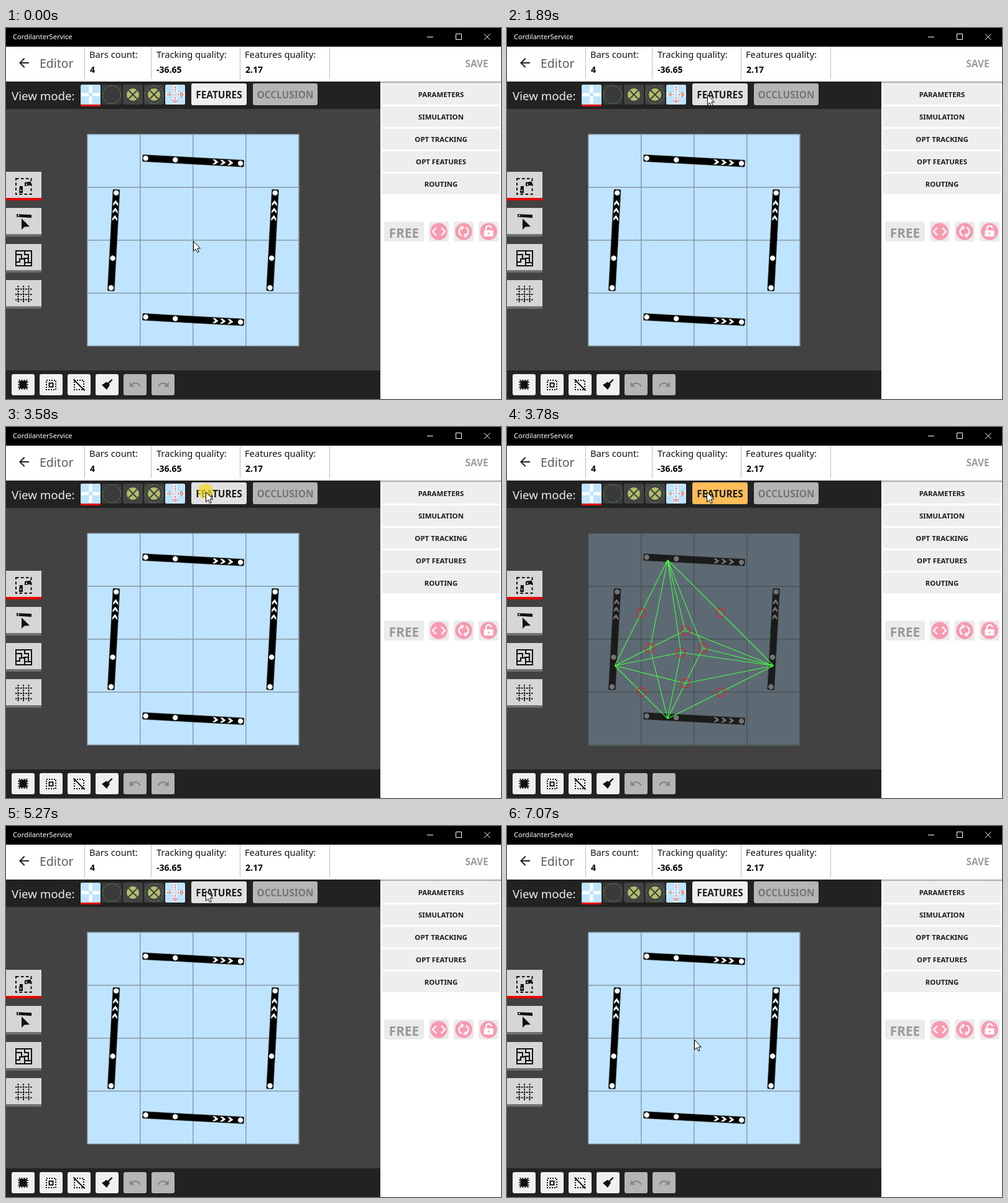
Animation of 796 by 596 pixels, one loop 7860 ms. Source, as an HTML page:

```html
<!DOCTYPE html>
<html lang="en">
<head>
<meta charset="utf-8">
<title>Editor</title>
<style>
html, body { margin: 0; width: 100%; height: 100%; overflow: hidden; background: #444; }
svg { display: block; width: 796px; height: 596px; }
text { font-family: "Noto Sans", "Open Sans", sans-serif; white-space: pre; }
.label { font-size: 14.7px; fill: #111; }
.value { font-size: 14px; font-weight: 700; fill: #000; }
.caps { font-size: 15.4px; font-weight: 600; text-anchor: middle; }
.menu { font-size: 11.4px; font-weight: 600; text-anchor: middle; fill: #1a1a1a; }
.tip { font-size: 13px; fill: #111; }
.line { fill: none; stroke: #111; stroke-width: 2; }
</style>
</head>
<body>
<svg id="stage" viewBox="0 0 796 596">
  <defs>
    <linearGradient id="shade" x2="0" y2="1">
      <stop stop-color="#999"/><stop offset="1" stop-color="#fff"/>
    </linearGradient>
    <g id="bar">
      <rect x="-5" y="-5.5" width="163" height="11" rx="1.5" stroke="#444" stroke-width=".6"/>
      <g fill="#fff">
        <circle r="4.2"/><circle cx="47.6" r="4.2"/><circle cx="152.6" r="4.2"/>
        <path id="chev" d="M107.5-4h4l5.5 4-5.5 4h-4l4.5-4z"/>
        <use href="#chev" x="12"/><use href="#chev" x="24"/>
      </g>
    </g>
    <path id="undo" d="M12.5 8c-2.65 0-5.05.99-6.9 2.6L2 7v9h9l-3.62-3.62c1.39-1.16 3.16-1.88 5.12-1.88 3.54 0 6.55 2.31 7.6 5.5l2.37-.78C21.08 11.03 17.15 8 12.5 8z"/>
    <path id="plus" d="M-15-2.5h12v5h-12zM3-2.5h12v5H3zM-2.5-15h5v12h-5zM-2.5 3h5v12h-5z"/>
  </defs>

  <!-- window title -->
  <rect width="796" height="30"/>
  <text x="11" y="18" font-size="11.1" fill="#fff">CordilanterService</text>
  <path d="M677 14.5h10M723.5 9.5h9v9h-9zM769 9.5l9.5 9.5M778.5 9.5l-9.5 9.5" fill="none" stroke="#fff"/>

  <!-- header -->
  <rect y="30" width="796" height="56" fill="#fff"/>
  <path transform="translate(17 44)" fill="#222" d="M20 11H7.83l5.59-5.59L12 4l-8 8 8 8 1.41-1.41L7.83 13H20z"/>
  <text x="54" y="64" font-size="19.4" fill="#5c5c5c">Editor</text>
  <path d="M126.5 30v52M233.5 30v52M376.5 30v52M520.5 30v52" stroke="#bdbdbd"/>
  <text class="label" x="134" y="48">Bars count:</text>
  <text class="label" x="242" y="48">Tracking quality:</text>
  <text class="label" x="384" y="48">Features quality:</text>
  <text class="value" x="135" y="72">4</text>
  <text class="value" x="242" y="72">-36.65</text>
  <text class="value" x="385" y="72">2.17</text>
  <text class="caps" x="757" y="62.5" fill="#9c9c9c">SAVE</text>

  <!-- work area -->
  <rect y="130" width="602" height="420" fill="#424242"/>
  <rect y="86" width="602" height="44" fill="#222"/>
  <rect y="550" width="602" height="46" fill="#222"/>
  <text x="9" y="115.5" font-size="18.7" fill="#ececec">View mode:</text>

  <!-- view mode icons -->
  <rect x="120" y="91" width="32" height="33" rx="2" fill="#bfe4ff"/>
  <use href="#plus" x="136" y="107" fill="#fff"/>
  <rect x="120" y="123" width="32" height="3" fill="#e60000"/>
  <g fill="#424242">
    <rect x="154" y="91" width="32" height="32" rx="3" fill="#3a3a3a"/>
    <rect x="188" y="91" width="32" height="32" rx="3"/>
    <rect x="222" y="91" width="32" height="32" rx="3"/>
  </g>
  <g fill="none" stroke="#4f8a4f" stroke-dasharray="5 1.5">
    <circle cx="170" cy="107" r="14.5"/><circle cx="238" cy="107" r="14.5"/>
  </g>
  <g fill="#b3bd6c" stroke="#3c3c3c" stroke-width="1.8">
    <circle cx="204" cy="107" r="10" stroke="none"/><circle cx="238" cy="107" r="10" stroke="none"/>
    <path d="M197 100l14 14M211 100l-14 14M231 100l14 14M245 100l-14 14"/>
  </g>
  <rect x="256" y="91" width="32" height="32" rx="2" fill="#bfe4ff"/>
  <use href="#plus" x="272" y="107" fill="#fff"/>
  <g fill="none" stroke-width="2.4" stroke-dasharray="2.5 1.2">
    <path d="M259 107h9M272 111v9" stroke="#e87878"/>
    <path d="M276 107h9M272 94v9" stroke="#e87878"/>
    <path d="M263 103v8M281 103v8" stroke="#8cc08c"/>
    <path d="M268 116l4 4 4-4M281 103l4 4-4 4" stroke="#e87878" stroke-dasharray="none" stroke-width="1.5"/>
  </g>

  <rect id="button" x="298" y="89" width="89" height="35" rx="3"/>
  <text class="caps" x="342.5" y="113" fill="#1c1c1c">FEATURES</text>
  <rect x="397" y="89" width="104" height="35" rx="3" fill="#b5b5b5"/>
  <text class="caps" x="449" y="113" fill="#757575">OCCLUSION</text>

  <!-- side panel -->
  <rect x="602" y="86" width="194" height="510" fill="#fff"/>
  <rect x="602" y="86" width="194" height="4" fill="url(#shade)"/>
  <g id="menu"></g>
  <g fill="#ebebeb">
    <rect x="608" y="311" width="64" height="32" rx="4"/>
    <rect x="680" y="311" width="32" height="32" rx="4"/>
    <rect x="720" y="311" width="32" height="32" rx="4"/>
    <rect x="760" y="311" width="32" height="32" rx="4"/>
  </g>
  <text x="640" y="337" font-size="20.8" font-weight="600" text-anchor="middle" fill="#999">FREE</text>
  <g fill="#f79ab0">
    <circle cx="696" cy="327" r="13.7"/><circle cx="736" cy="327" r="13.7"/><circle cx="776" cy="327" r="13.7"/>
  </g>
  <g fill="none" stroke="#fff" stroke-width="2.4">
    <path d="M692 321l-6 6 6 6M700 321l6 6-6 6"/>
    <path d="M733 333.5a7 7 0 0 1 0-13M739 320.5a7 7 0 0 1 0 13"/>
    <path d="M731 318l4.500 2-3 4M741 336l-4.500-2 3-4" stroke-width="1.8"/>
    <path d="M772 325v-3a4.200 4.200 0 0 1 8.400 0"/>
  </g>
  <rect x="768.500" y="325" width="15" height="10" rx="1" fill="#fff"/>
  <circle cx="776" cy="330" r="1.500" fill="#f79ab0"/>

  <!-- left tools -->
  <g id="tools"></g>
  <rect class="line" x="16" y="242" width="24.500" height="25" stroke-dasharray="4.500 3.500"/>
  <path d="M30 248l10-1.500v6l-10 1.500zM22 254h5v11h-6z" fill="#111"/>
  <circle cx="33" cy="251" r="1.200" fill="#d6d6d6"/><circle cx="24" cy="261" r="1.200" fill="#d6d6d6"/>
  <path d="M17 299l24 1v5l-24-1.500zM25 306v18l4.500-4.500 8.500-.5z" fill="#111"/>
  <circle cx="20" cy="301.300" r="1.200" fill="#d6d6d6"/>
  <path class="line" d="M16 358h25v24H16zM16 364h9v7M30 358v6h6v6h-8M16 376h6v-5h8v6h6M30 377v5M36 370v7h5"/>
  <path class="line" d="M15 419.500h27M15 428h27M15 436.500h27M19.500 414v28M28 414v28M36.500 414v28" stroke-dasharray="2.500 1.500"/>

  <!-- bottom tools -->
  <g id="actions"></g>
  <rect x="21.500" y="567" width="12" height="12" fill="#111"/>
  <rect class="line" x="20.500" y="566" width="14" height="14" stroke-dasharray="2 2"/>
  <rect class="line" x="65" y="566" width="15" height="15" stroke-dasharray="2 2"/>
  <rect class="line" x="69.500" y="570.500" width="6" height="6"/>
  <rect class="line" x="110" y="566" width="15" height="15" stroke-width="1.700" stroke-dasharray="2 2"/>
  <path class="line" d="M108.500 564.500l18 18" stroke-width="1.700"/>
  <path d="M170 564l1.500 1.500-6 6 1.500 2-5 7.500-8-7.500 7.500-5 2 1.500z" fill="#111"/>
  <use href="#undo" transform="translate(197 562.500) scale(.87)" fill="#858585"/>
  <use href="#undo" transform="translate(263.500 562.500) scale(-.87 .87)" fill="#858585"/>

  <!-- board -->
  <rect x="130.500" y="170.500" width="341" height="340.500" fill="#bfe4ff"/>
  <path id="grid" fill="none" stroke="#7f8b94" stroke-width="1.200"/>
  <use href="#bar" transform="translate(224.700 209.200) rotate(3.100)"/>
  <use href="#bar" transform="translate(224.700 464.300) rotate(3.100)"/>
  <use href="#bar" transform="translate(169 417.300) rotate(-86.900)"/>
  <use href="#bar" transform="translate(424.500 417.300) rotate(-86.900)"/>

  <g id="features" fill="none">
    <rect x="130" y="170" width="342" height="341" fill="#2a2a2a" opacity=".65"/>
    <path id="rays" stroke="#42ff42" stroke-width="1.100"/>
    <g id="rings" stroke="#e0201c" stroke-width="1.300"></g>
  </g>

  <g id="tip">
    <rect x="298" y="131" width="210" height="70" rx="2" fill="#cbcbcb"/>
    <text class="tip" x="302.500" y="152">Display unique combinations of</text>
    <text class="tip" x="302.500" y="172">bars. Tracker must see one for</text>
    <text class="tip" x="302.500" y="192">initialization. Hotkey: f</text>
  </g>

  <circle id="click" cx="321" cy="103" r="12" fill="#f4da24" opacity=".75"/>
  <path id="cursor" d="M.5.500v16l3.700-3.500 2.500 5.500 2.500-1.100L6.800 12h4.700z" fill="#fff" stroke="#000"/>
</svg>
<script>
const $ = id => document.getElementById(id);
const add = (parent, name, attrs, text = "") => {
  const el = document.createElementNS("http://www.w3.org/2000/svg", name);
  for (const key in attrs) el.setAttribute(key, attrs[key]);
  el.textContent = text;
  return $(parent).appendChild(el);
};

["PARAMETERS", "SIMULATION", "OPT TRACKING", "OPT FEATURES", "ROUTING"].forEach((name, i) => {
  const y = 90 + 36 * i;
  add("menu", "rect", { x: 605, y, width: 189, height: 33, rx: 1, fill: "#edeeee" });
  add("menu", "text", { class: "menu", x: 699.5, y: y + 21 }, name);
});

for (let i = 0; i < 4; i++) {
  const y = 231 + 58 * i;
  add("tools", "rect", { x: 0, y, width: 57, height: 46, rx: 1.5, fill: i ? "#707070" : "#e60000" });
  add("tools", "rect", { x: 0, y, width: 57, height: 42, fill: "#d6d6d6" });
}

for (let i = 0; i < 6; i++) {
  add("actions", "rect", { x: 9 + 45 * i, y: 556, width: 37, height: 34, rx: 3, fill: i < 4 ? "#f0f0f0" : "#b5b5b5" });
}

let grid = "";
for (let i = 0; i < 5; i++) {
  const d = 85 * i;
  grid += `M${130.8 + d} 170.5v340.5M130.500 ${170.8 + d}h341`;
}
$("grid").setAttribute("d", grid);

// Every combination of bars, except the two opposite pairs, joins at its centroid.
const nodes = [[258.3, 213.5], [428.7, 383.5], [258.3, 468.5], [173.3, 383.5]];
let rays = "";
for (let mask = 3; mask < 16; mask++) {
  const set = nodes.filter((_, i) => mask >> i & 1);
  if (set.length < 2 || mask === 5 || mask === 10) continue;
  const [cx, cy] = [0, 1].map(k => set.reduce((sum, p) => sum + p[k], 0) / set.length);
  for (const [x, y] of set) rays += `M${cx} ${cy}L${x} ${y}`;
  add("rings", "circle", { cx, cy, r: 7.2 });
}
$("rays").setAttribute("d", rays);

// Pointer positions, one every 100 ms.
const LOOP = 7860, STEP = 100;
const toButton = [
  [301, 342], [303, 334], [308, 312], [314, 286], [320, 259], [325, 234], [330, 211],
  [333, 189], [333, 165], [331, 146], [328, 129], [325, 116], [322, 107], [321, 104]
];
const toBoard = [
  [321, 104], [321, 106], [322, 113], [323, 125], [324, 141], [324, 162], [324, 185], [324, 208],
  [323, 230], [320, 254], [316, 277], [312, 299], [308, 318], [304, 332], [302, 340], [301, 343]
];
const pointAt = (path, ms) =>
  path[Math.max(0, Math.min(path.length - 1, Math.floor(ms / STEP)))];
const between = (t, from, to) => t >= from && t < to;
const show = (id, on) => $(id).style.display = on ? "" : "none";

function draw() {
  const t = performance.now() % LOOP;
  const [x, y] = t < 5570 ? pointAt(toButton, t - 690) : pointAt(toBoard, t - 5570);
  const active = between(t, 3780, 5270);
  $("cursor").setAttribute("transform", `translate(${x} ${y})`);
  $("button").setAttribute("fill", active ? "#ffbd58" : y < 124 ? "#e1e1e1" : "#efefef");
  show("features", active);
  show("tip", between(t, 2190, 3580));
  show("click", between(t, 3580, 3780) || between(t, 5070, 5270));
  requestAnimationFrame(draw);
}
draw();
</script>
</body>
</html>
```
